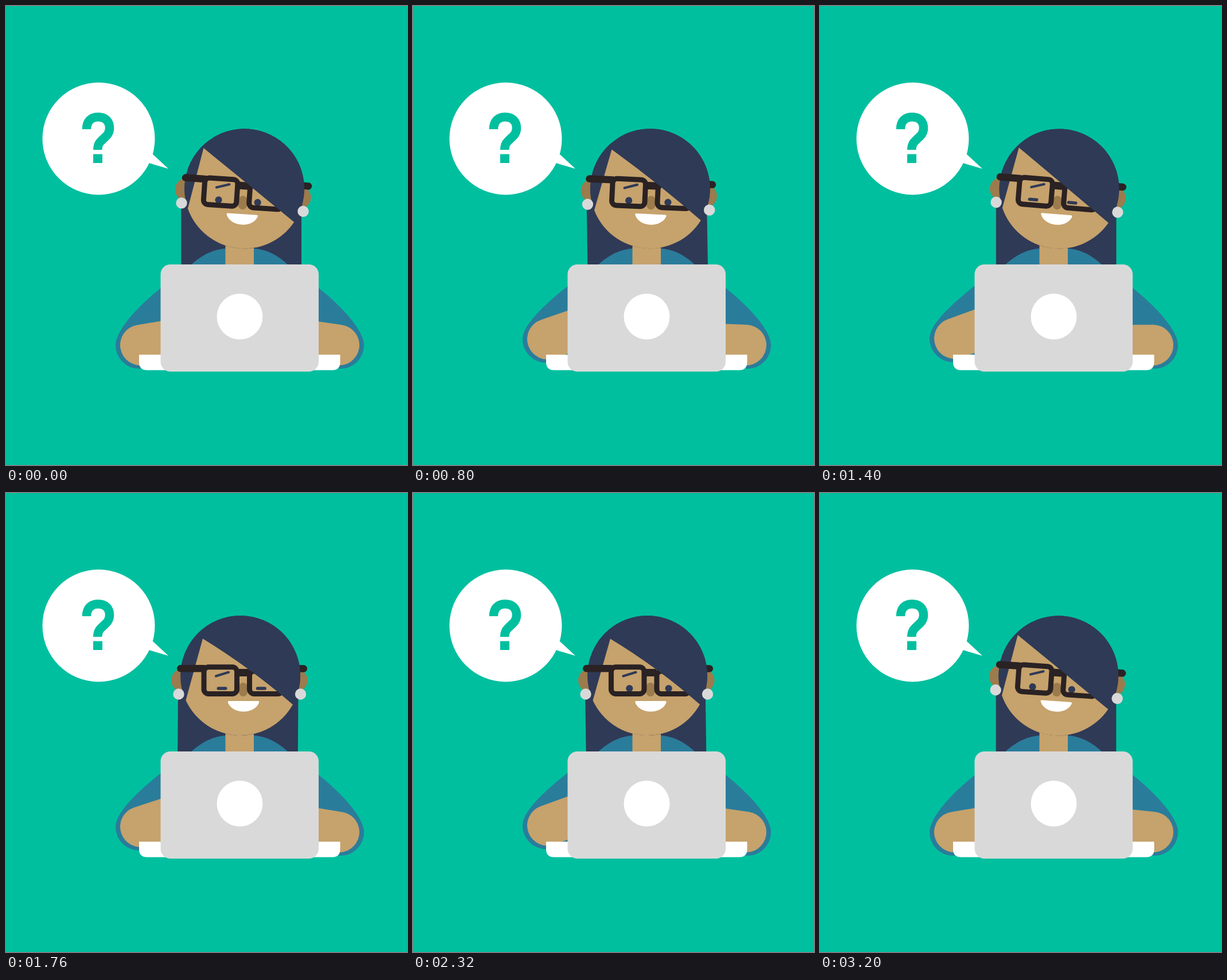
An HTML page for the animation above (3.24 s loop, 699 by 801 pixels).

```html
<!DOCTYPE html>
<html lang="en">
<head>
<meta charset="utf-8">
<title>Question at the laptop</title>
<style>
html, body { margin: 0; width: 100%; height: 100%; overflow: hidden; background: #00bf9f; }
svg { display: block; width: 100vw; height: 100vh; }
.navy { fill: #2f3a56; }
.teal { fill: #2a7c9b; }
.skin { fill: #c6a26c; }
.shade { fill: #9c7b4c; }
.grey { fill: #d9d9d9; }
.white { fill: #fff; }
.line { fill: none; stroke: #2a2223; stroke-linecap: round; }
.forearm { stroke: #c6a26c; stroke-width: 71; stroke-linecap: round; }
</style>
</head>
<body>
<svg viewBox="0 0 699 801">
  <g id="bubble">
    <circle class="white" cx="161.5" cy="231.5" r="98"/>
    <path class="white" d="M255 258L283 284L244 272.500Z"/>
    <path d="M140.500 215C140.500 201 148 193.700 160.500 193.700S180.500 201 180.500 213C180.500 222 176 226 170 231.500C163 238 159.800 241 159.800 251"
      fill="none" stroke="#00bf9f" stroke-width="15.500"/>
    <rect x="152" y="258.500" width="16" height="15.500" fill="#00bf9f"/>
  </g>

  <path id="backHair" class="navy"/>
  <path class="teal" d="M318 456Q350 424 386 423H429Q465 424 496 456Z"/>
  <rect class="skin" x="382.500" y="400" width="49.500" height="60"/>

  <g>
    <path id="leftSleeve" class="teal"/>
    <line id="leftForearm" class="forearm"/>
  </g>
  <g transform="translate(815) scale(-1 1)">
    <path id="rightSleeve" class="teal"/>
    <line id="rightForearm" class="forearm"/>
  </g>

  <g id="head">
    <circle class="shade" cx="308" cy="327" r="20"/>
    <circle class="shade" cx="505.500" cy="327" r="20"/>
    <circle class="navy" cx="408.500" cy="318.500" r="104.500"/>
    <path id="face" class="skin"/>
    <g id="features">
      <rect class="shade" x="406" y="331" width="15" height="24" rx="7.500"/>
      <path class="white" d="M389 363H439Q442 363 441 366C437 376 426 381.500 414 381.500S391 376 387 366Q386 363 389 363Z"/>
      <path d="M366 319.500L388 312.800" stroke="#2f3a56" stroke-width="4.200" stroke-linecap="round"/>
    </g>
    <g id="eyes">
      <rect class="navy"/>
      <rect class="navy"/>
    </g>
    <path id="temples" class="line" stroke-width="12.500"/>
    <g id="lenses" class="line" stroke-width="9">
      <rect x="345" y="303.800" width="57.500" height="46.700" rx="8"/>
      <rect x="424.500" y="311" width="57.500" height="39.500" rx="8"/>
      <path d="M404 313.500H424" stroke-width="13" stroke-linecap="butt"/>
    </g>
    <path id="fringe" class="navy"/>
    <circle class="grey" cx="301" cy="351" r="9.700"/>
    <circle class="grey" cx="513.500" cy="351" r="9.700"/>
  </g>

  <path class="white" d="M232 608.500H582.500V621.500Q582.500 635.500 568.500 635.500H246Q232 635.500 232 621.500Z"/>
  <rect class="grey" x="269.500" y="451" width="275.500" height="187" rx="17"/>
  <circle class="white" cx="407.500" cy="542" r="40"/>
</svg>
<script>
const $ = id => document.getElementById(id);
const LOOP = 3240, STEP = 40, HEAD_CYCLE = 1620, ARM_CYCLE = 540;
const RAD = Math.PI / 180;

// time, tilt, gaze, temple shift, hair centre at ears, hair centre at shoulders
const headKeys = [
  [0, 3.9, -11.5, 0.7, 410.2, 410.2],
  [140, 0, 0, 0, 404.7, 404],
  [400, -8.1, 13, -1, 397.5, 395],
  [700, 0, 0.8, -2, 405, 406.5],
  [800, 2.7, -4.2, -2.2, 407.5, 409.2],
  [1000, 4.5, -10, -1.5, 410.5, 411.6],
  [1400, 4.7, -11.7, 0, 411.7, 411.7],
  [1580, 4, -11.6, 0.6, 411.5, 411.5]
];
// time, height of the left forearm where it meets the screen
const leftKeys = [
  [0, 550], [80, 547], [140, 533], [165, 528.5],
  [260, 531], [320, 529], [400, 547], [500, 550]
];

// Periodic monotone cubic through one column of keys
function curve(keys, col, time, cycle) {
  const n = keys.length;
  const key = i => {
    const k = keys[(i + n) % n];
    return [k[0] + cycle * Math.floor(i / n), k[col]];
  };
  const slope = i => {
    const [t0, v0] = key(i), [t1, v1] = key(i + 1);
    return (v1 - v0) / (t1 - t0);
  };
  const tangent = i => {
    const a = slope(i - 1), b = slope(i);
    return a * b > 0 ? 2 * a * b / (a + b) : 0;
  };
  const t = time % cycle;
  let i = n - 1;
  while (keys[i][0] > t) i--;
  const [t0, v0] = key(i), [t1, v1] = key(i + 1);
  const d = t1 - t0, u = (t - t0) / d, w = 1 - u;
  return w * w * ((1 + 2 * u) * v0 + u * d * tangent(i)) +
         u * u * ((3 - 2 * u) * v1 - w * d * tangent(i + 1));
}

const set = (el, attrs) => {
  for (const name in attrs) el.setAttribute(name, attrs[name]);
};
const onHead = deg => [
  408.5 + 104.5 * Math.cos(deg * RAD),
  318.5 + 104.5 * Math.sin(deg * RAD)
];

function drawArm(side, lift, angle) {
  const y = 592 - 11.5 * lift, top = 492 - 4 * lift;
  set($(side + 'Sleeve'), {
    d: `M300 ${top - 24}L270 ${top}C225 ${top + 36} 191 ${y - 24} 191 ${y}A41 41 0 0 0 232 ${y + 41}L300 ${y + 28}Z`
  });
  set($(side + 'Forearm'), {
    x1: 234.5, y1: y - 0.3,
    x2: 234.5 + 80 * Math.cos(angle * RAD),
    y2: y - 0.3 - 80 * Math.sin(angle * RAD)
  });
}

function drawHead(time) {
  const [tilt, gaze, temple, hairTop, hairEnd] =
    [1, 2, 3, 4, 5].map(col => curve(headKeys, col, time, HEAD_CYCLE));
  const turn = gaze * 0.53;
  const part = 1.18 * gaze + 0.026 * gaze * gaze;
  const shift = `translate(${turn})`;

  set($('head'), { transform: `rotate(${tilt} 407.5 421)` });
  set($('features'), { transform: shift });
  set($('lenses'), { transform: shift });
  set($('temples'), {
    d: `M${304.2 + temple} 306.3H${345 + turn}M480 306.5H${518.8 + temple}`
  });

  const half = 104.8, lean = 1.8 * tilt;
  set($('backHair'), {
    d: `M${hairTop - half} ${351 - lean}L${hairEnd - half} 455H${hairEnd + half}L${hairTop + half} ${351 + lean}Z`
  });

  // Hair parting: one edge runs to each side of the head
  const px = 343 + part, py = 254 + 0.15 * part;
  const [rx, ry] = onHead(28.9 - 0.1 * part);
  const left = onHead(155.5 - 0.12 * part);
  const bulge = 2 * Math.max(0, 4 + 0.38 * part);
  const sweep = `M${px} ${py}Q${(px + rx) / 2 + bulge * 0.6} ${(py + ry) / 2 - bulge * 0.8} ${rx} ${ry}`;
  set($('face'), { d: `${sweep}A104.5 104.5 0 0 1 ${left}Z` });
  set($('fringe'), { d: `${sweep}A104.5 104.5 0 0 0 ${onHead(-125)}Z` });

  const closed = time >= 1360 && time < 1800;
  const [w, h] = closed ? [18, 5.5] : [12.2, 12.2];
  [...$('eyes').children].forEach((eye, i) => set(eye, {
    x: 376.5 + 68.3 * i + gaze - w / 2, y: 341 - h / 2,
    width: w, height: h, rx: h / 2
  }));
}

function draw(time) {
  drawHead(time);
  const lift = (550 - curve(leftKeys, 1, time, ARM_CYCLE)) / 21;
  drawArm('left', lift, 9.5 + 10.5 * lift);
  const press = Math.cos(2 * Math.PI * (time - 350) / ARM_CYCLE);
  drawArm('right', 0, 5 - 5.5 * press);
}

const start = performance.now();
function tick() {
  const elapsed = performance.now() - start;
  draw(Math.floor(elapsed / STEP) * STEP % LOOP);
  requestAnimationFrame(tick);
}
tick();
</script>
</body>
</html>
```
